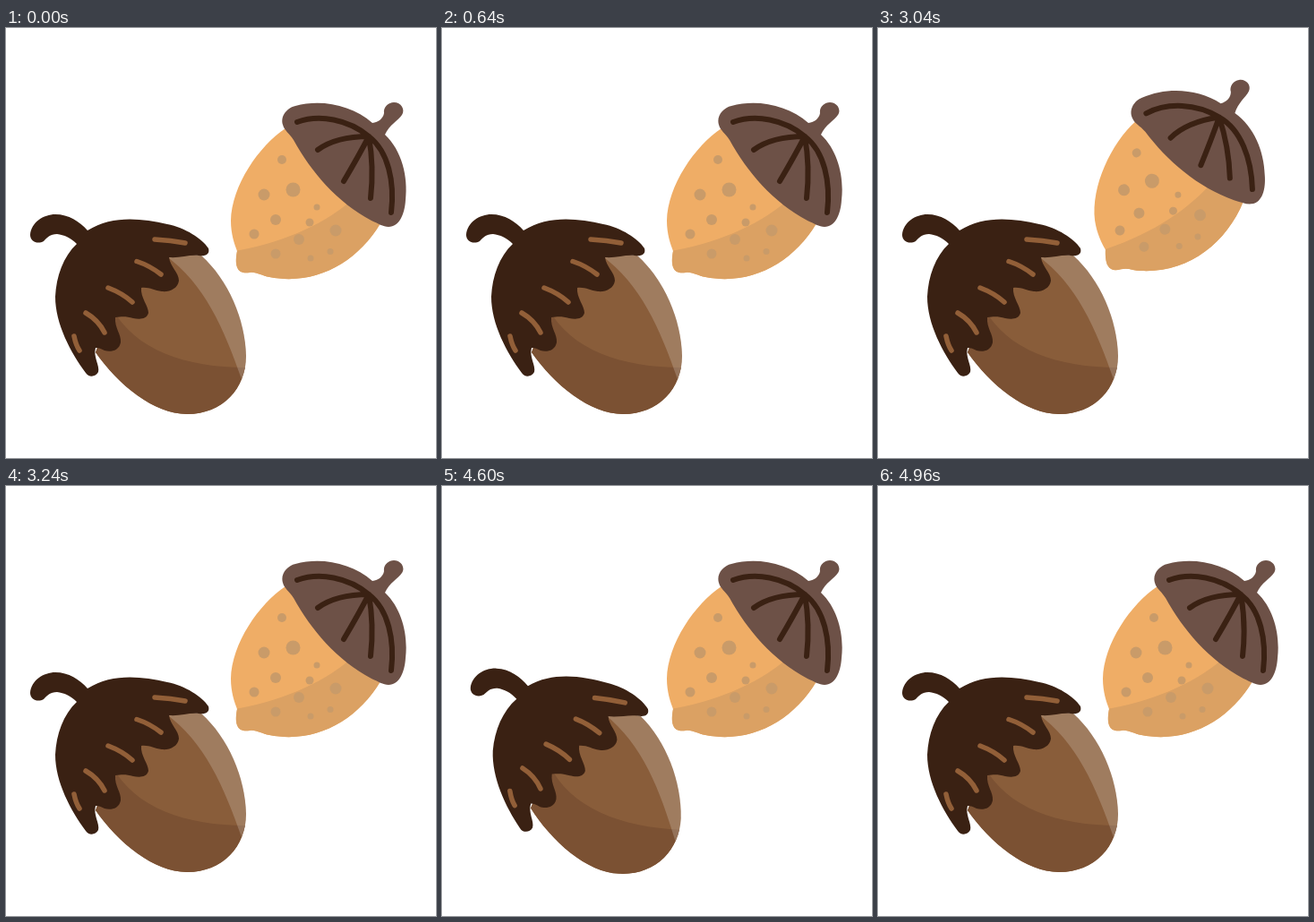
An HTML page that plays this animation: 480x480 px, repeating every 5000 ms.

```html
<!DOCTYPE html>
<html lang="en">
<head>
<meta charset="utf-8">
<title>Acorns</title>
<style>
  html, body { margin: 0; width: 100%; height: 100%; overflow: hidden; background: #fff; }
  svg { display: block; width: 100vw; height: 100vh; }
  .line { fill: none; stroke-linecap: round; stroke-linejoin: round; }
</style>
</head>
<body>
<svg viewBox="0 0 480 480">
  <defs>
    <clipPath id="paleClip">
      <path id="paleBody" d="M312 112C282 132 252 176 251 215C251 230 255 241 258 249C257 254 256 262 258 267C260 273 266 274 272 273C280 272 286 277 294 278C345 288 392 262 418 218Z"/>
    </clipPath>
    <clipPath id="darkClip">
      <path id="darkBody" d="M100 362C125 398 165 431 202 431C242 431 268 402 268 366C267 325 248 281 218 254L180 250L120 310Z"/>
    </clipPath>
  </defs>

  <g id="dark">
    <use href="#darkBody" fill="#895d3a"/>
    <g clip-path="url(#darkClip)">
      <path fill="#7b5133" d="M118 312C145 362 205 380 275 379V440H80V330Z"/>
      <path fill="#fff" fill-opacity=".19" d="M178 254C222 286 243 335 263 392L285 385L260 240Z"/>
    </g>
    <path fill="#3a2113" d="M79 241C72 234 65 231 57 230C49 230 46 234 42 238C35 242 27 238 27 231C28 217 42 208 55 208C70 208 82 216 91 226C118 209 150 212 180 219C200 223 219 235 226 246C228 253 222 255 215 254C204 253 194 257 182 256C183 266 193 273 193 282C192 291 182 295 174 294C165 293 160 289 151 290C150 301 159 310 159 318C157 326 148 325 142 324C135 322 130 322 122 323C121 335 129 342 128 351C126 361 116 362 110 360C106 358 104 357 100 357C97 367 105 377 103 384C100 390 92 390 89 385C72 362 55 330 55 300C56 277 64 255 79 241Z"/>
    <path class="line" stroke="#925f38" stroke-width="5.5" d="M166 236Q184 237 200 240M146 260.500Q160 265 173 275M114 290Q130 296 141 306M89 318Q103 326 110 340M76 344Q78 354 82 360"/>
  </g>

  <g id="pale">
    <use href="#paleBody" fill="#efad66"/>
    <path clip-path="url(#paleClip)" fill="#dba163" d="M250 250C305 241 350 222 384 194L430 218V290H250Z"/>
    <g id="spots" fill="#c99b69"></g>
    <path fill="#6d5147" d="M309 108C306 98 314 89 323 87C352 79 386 86 409 106C416 105 421 101 422 95C421 88 427 83 433 83C441 83 446 91 442 97C438 103 428 108 423 119C442 137 449 166 446 192C445 208 439 222 427 222C421 222 415 218 408 215C370 195 340 160 321 125C316 117 311 115 309 108Z"/>
    <path class="line" stroke="#3a2113" stroke-width="6" d="M325 105C350 96 382 102 405 121M348 136C363 125 385 121 405 121Q393 144 377 171M405 121Q411 155 407 190M405 121C427 138 434 172 430 206"/>
  </g>
</svg>
<script>
const LOOP = 5000, STEP = 40;
const byId = id => document.getElementById(id);
const pale = byId('pale'), dark = byId('dark');

// x, y, radius
const spots = [
  [308, 147, 5], [288, 186, 6.5], [320.5, 180.5, 8], [347, 200, 3.5],
  [301, 214, 6], [339, 217, 4.5], [277, 230, 5.5], [327, 236, 6],
  [368, 226, 6.5], [301, 252, 5.5], [340, 257, 3.5], [362, 249.5, 3.5]
];
byId('spots').innerHTML = spots
  .map(([x, y, r]) => `<circle cx="${x}" cy="${y}" r="${r}"/>`).join('');

// start, duration, peak angle
const paleSwings = [[160, 480, -10], [2760, 480, -10]];
const darkSwings = [[320, 320, 6], [2680, 320, 6], [4320, 320, 10], [4640, 320, 10]];

function angleAt(t, swings) {
  return swings.reduce((sum, [start, length, peak]) => {
    const p = (t - start) / length;
    return p > 0 && p < 1 ? sum + peak * (1 - Math.abs(2 * p - 1)) : sum;
  }, 0);
}

function draw(ms) {
  const t = Math.floor((ms % LOOP) / STEP) * STEP;
  pale.setAttribute('transform', `rotate(${angleAt(t, paleSwings)} 246 276)`);
  dark.setAttribute('transform', `rotate(${angleAt(t, darkSwings)} 158 338)`);
}

const begin = performance.now();
function tick() {
  draw(performance.now() - begin);
  requestAnimationFrame(tick);
}
tick();
</script>
</body>
</html>
```
